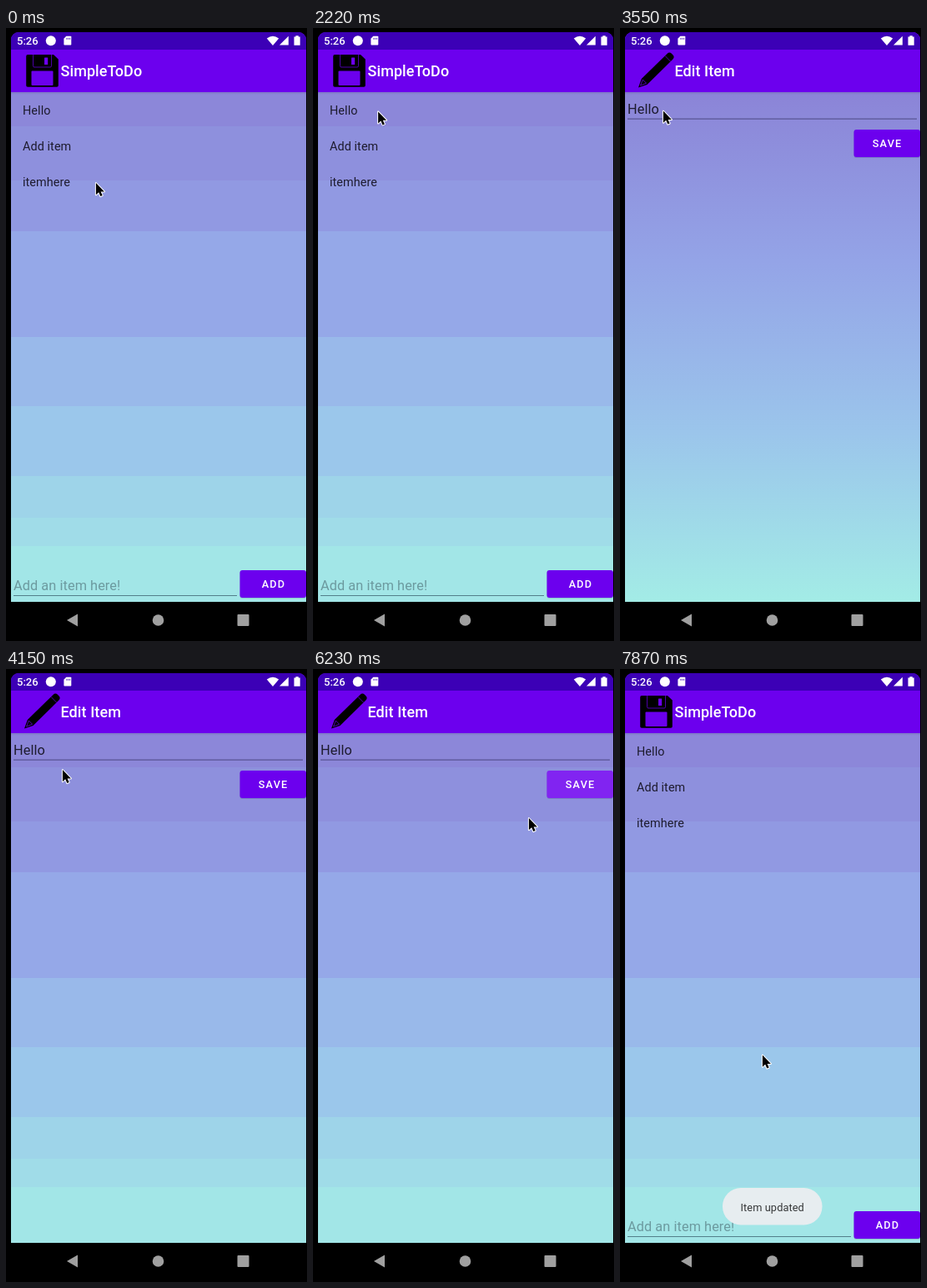
An HTML page that plays this animation: 361x736 px, repeating every 8 s.

```html
<!DOCTYPE html>
<html lang="en">
<head>
<meta charset="utf-8">
<title>To-do app</title>
<style>
  html, body { margin: 0; width: 100%; height: 100%; overflow: hidden; background: #000; }
  svg { display: block; width: 361px; height: 736px; }
  text { font-family: Roboto, "Noto Sans", sans-serif; font-size: 14.4px; letter-spacing: .08px; fill: #1d1b2e; }
  .title { font-size: 18px; font-weight: 500; fill: #fff; }
  .field { font-size: 16.3px; }
  .hint { fill: #6c9a9f; }
  .label { font-size: 12.7px; font-weight: 500; letter-spacing: 1.13px; fill: #fff; }
  .clock { font-size: 13px; font-weight: 500; letter-spacing: 0; fill: #fff; }
  .toast { font-size: 12.8px; fill: #363839; }
</style>
</head>
<body>
<svg viewBox="0 0 361 736" xmlns="http://www.w3.org/2000/svg">
  <defs>
    <clipPath id="screen"><path d="M6 736V14A9 9 0 0 1 15 5H351A9 9 0 0 1 360 14V736Z"/></clipPath>
    <clipPath id="saveClip"><rect x="280.5" y="122" width="79.5" height="33" rx="3"/></clipPath>
    <linearGradient id="shade" x2="0" y2="1">
      <stop stop-color="#302858" stop-opacity=".16"/>
      <stop offset="1" stop-color="#302858" stop-opacity="0"/>
    </linearGradient>
    <linearGradient id="sky" x2="0" y2="1"></linearGradient>
  </defs>
  <rect width="361" height="736"/>
  <g clip-path="url(#screen)">
    <g id="main"></g>
    <g id="edit"></g>
  </g>

  <g fill="#fff">
    <text class="clock" x="13" y="20">5:26</text>
    <circle cx="53.8" cy="15.3" r="6"/>
    <path d="M72.3 9.8H77.5Q78.3 9.8 78.3 10.6V19.8Q78.3 20.6 77.5 20.6H70.2Q69.4 20.6 69.4 19.8V12.8Z"/>
    <path d="M72.8 11.8v2M74.7 11.8v2M76.6 11.8v2" stroke="#3c00b6" stroke-width=".8"/>
    <path d="M312.8 12.4Q320 7.2 327.2 12.4L320 20.9Z"/>
    <path d="M338.8 9.7V20.5H328Z"/>
    <path d="M347.4 9.3h3.4v1.2h1.9v10.3h-7.2V10.5h1.9Z"/>
  </g>
  <g fill="#a0a0a0">
    <path d="M73 711L86 703.5V718.5Z"/>
    <circle cx="182.5" cy="711" r="6.8"/>
    <rect x="277.5" y="704" width="14" height="14" rx="1"/>
  </g>

  <g id="toast">
    <rect x="123" y="623" width="119.5" height="44.5" rx="22" fill="#e7edf0"/>
    <text class="toast" x="182.7" y="650.5" text-anchor="middle">Item updated</text>
  </g>
  <g id="cursor">
    <path id="arrow" d="M.9 1.6V15.8L4.2 12.7L6.3 17.6L8.7 16.6L6.6 11.9H10.9Z" stroke="#fff" stroke-width="2" stroke-linejoin="round" paint-order="stroke"/>
  </g>
</svg>
<script>
const LOOP = 8000;
const TICK = 148.2; // the picture refreshes once per tick
const PURPLE = '#6c00ee';
const TOP = 77, BOTTOM = 689;
const $ = id => document.getElementById(id);
const clamp = v => Math.min(1, Math.max(0, v));
const mix = (a, b, k) => a + (b - a) * k;

// Background colours from top to bottom, evenly spread
const sky = [[139, 132, 215], [148, 164, 231], [155, 197, 235], [163, 236, 230]];

function skyAt(k) {
  const pos = clamp(k) * (sky.length - 1);
  const i = Math.min(sky.length - 2, Math.floor(pos));
  return `rgb(${sky[i].map((c, n) => Math.round(mix(c, sky[i + 1][n], pos - i)))})`;
}

$('sky').innerHTML = sky.map((c, i) =>
  `<stop offset="${i / (sky.length - 1)}" stop-color="rgb(${c})"/>`).join('');

const rect = (x, y, w, h, fill, rx = 0) =>
  `<rect x="${x}" y="${y}" width="${w}" height="${h}" rx="${rx}" fill="${fill}"/>`;

const text = (x, y, str, cls = '') => `<text x="${x}" y="${y}" class="${cls}">${str}</text>`;

// Each band reaches the bottom, so no seams show when zoomed
const edges = [TOP, 118, 183, 244, 371, 454, 538, 588, 622, BOTTOM];
const bands = edges.slice(1).map((end, i) => rect(6, edges[i], 354, BOTTOM - edges[i],
  skyAt(((edges[i] + end) / 2 - TOP) / (BOTTOM - TOP)))).join('');

const button = (y, x, str, extra = '') =>
  rect(280.5, y + 1, 79.5, 33, 'rgba(30,50,90,.2)', 3) +
  rect(280.5, y, 79.5, 33, PURPLE, 3) + extra + text(x, y + 21.4, str, 'label');

const page = (title, icon, content) => `
  ${rect(6, BOTTOM, 354, 47, '#000')}
  <g class="bands">${bands}</g>
  <g class="smooth">${rect(6, TOP, 354, BOTTOM - TOP, 'url(#sky)')}</g>
  ${rect(6, 5, 354, 72, PURPLE)}${rect(6, 5, 354, 21, '#3c00b6')}
  ${rect(6, TOP, 354, 3, 'url(#shade)')}
  ${icon}${text(65.5, 58.3, title, 'title')}${content}`;

const floppy = `
  <path d="M26 32H57L62.8 37.6V69Q62.8 70.8 61 70.8H26Q24.2 70.8 24.2 69V34Q24.2 32 26 32Z"/>
  <path d="M32.5 32V45.5Q32.5 47 34 47H53Q54.5 47 54.5 45.5V32" fill="none" stroke="${PURPLE}" stroke-width=".7"/>
  ${rect(46, 35.5, 4.2, 8.5, PURPLE, .5)}${rect(30.5, 51.5, 26, 17.5, PURPLE, 1)}`;

const pencil = `
  <g transform="translate(22 71.5) rotate(-44.5)">
    <path d="M0 0L10 -4.8H53Q57 -4.8 57 -1V1Q57 4.8 53 4.8H10Z"/>
    <path d="M3.5 0L10.5 -3V3ZM49.5 -4.8V4.8" fill="none" stroke="${PURPLE}" stroke-width=".7"/>
  </g>`;

$('main').innerHTML = page('SimpleToDo', floppy,
  ['Hello', 'Add item', 'itemhere'].map((s, i) => text(20, 104 + i * 43, s)).join('') +
  text(9, 675, 'Add an item here!', 'field hint') +
  rect(9, 681, 268, 1, '#527f8a') + button(651, 306.8, 'ADD'));

$('edit').innerHTML = page('Edit Item', pencil,
  text(9, 103, 'Hello', 'field') + rect(9, 108.6, 347, 1, '#4b4882') +
  button(122, 302.8, 'SAVE',
    '<circle id="ripple" cx="318" cy="140" fill="#fff" fill-opacity=".14" clip-path="url(#saveClip)"/>'));

// Pointer strokes: first tick, last tick, end x, end y
const strokes = [
  [0, 3, 90, 46], [4, 9, 47, 97],       // to the first list item
  [13, 16, 81, 99], [16, 18, 51, 98],   // aside and back
  [27, 28, 67, 119.5], [28, 30, 124, 354],
  [34, 37, 244, 231], [37, 39, 330, 110], [39, 40, 318, 138], // to the save button
  [41, 42, 258, 177.5], [42, 45, 181, 269], [45, 46, 171, 313.5], [46, 49, 170, 462]
];

const easeOut = u => 1 - (1 - u) ** 2;

function pointer(tick) {
  let p = [107, 184.5];
  for (const [from, to, ...end] of strokes) {
    const k = easeOut(clamp((tick - from) / (to - from)));
    p = p.map((v, i) => mix(v, end[i], k));
  }
  return p;
}

// Page change over 400 ms: quick start, very slow finish
function settle(t, start) {
  const u = clamp((t - start) / 400) * 6;
  return u < 1 ? .4 * u ** 2.5 : 1 - .6 * (1 - (u - 1) / 5) ** 6;
}

const show = (el, on) => el.setAttribute('visibility', on ? 'inherit' : 'hidden');
const zoom = (el, s) =>
  el.setAttribute('transform', `translate(183 369) scale(${s}) translate(-183 -369)`);

function draw(time) {
  const tick = Math.floor((time + 8) / TICK), t = tick * TICK;
  const open = settle(t, 3234), close = settle(t, 6225);
  const opening = tick >= 22 && tick < 25, editing = tick >= 25 && tick < 43;

  $('cursor').setAttribute('transform', `translate(${pointer(tick)})`);
  show($('main'), !editing);
  show($('edit'), editing || opening && tick > 22);
  zoom($('main'), tick < 43 ? 1 + .05 * open : mix(1.1, 1, close));
  zoom($('edit'), mix(.85, 1, open));
  document.querySelectorAll('.smooth').forEach(g => show(g, opening));
  document.querySelectorAll('.bands').forEach(g => show(g, !opening));
  $('ripple').setAttribute('r', Math.max(0, (tick - 39) * 30));
  show($('toast'), tick >= 46);
}

function frame(now) {
  draw(now % LOOP);
  requestAnimationFrame(frame);
}
draw(0);
requestAnimationFrame(frame);
</script>
</body>
</html>
```
